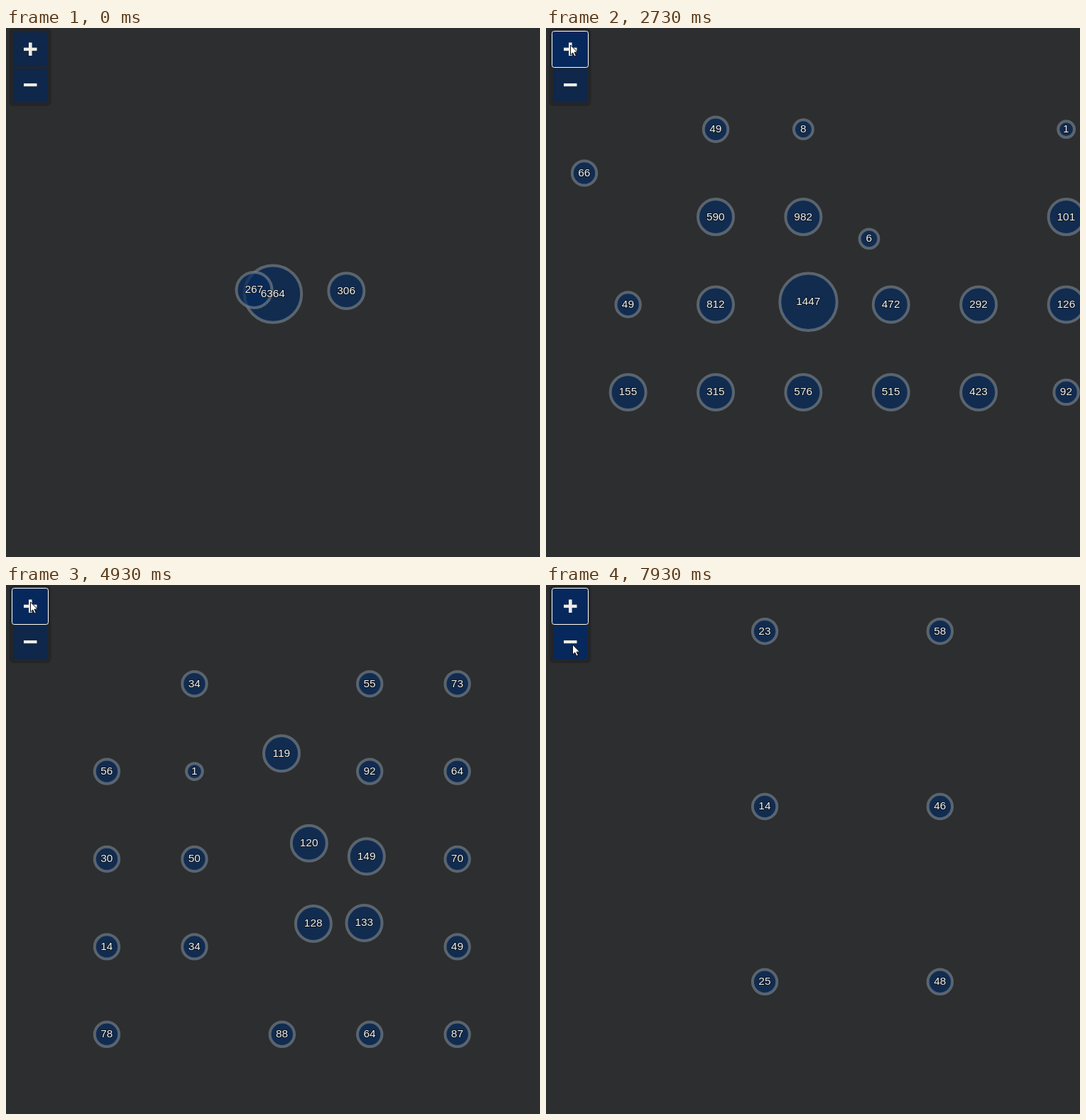
An HTML page with a canvas for the animation above (8 s loop, 752 by 745 pixels).

```html
<!DOCTYPE html>
<html lang="en">
<head>
<meta charset="utf-8">
<title>Cluster map zoom</title>
<style>
html, body { margin: 0; width: 100%; height: 100%; overflow: hidden; background: #2d2e2f; }
canvas { display: block; }
</style>
</head>
<body>
<canvas id="map" width="752" height="745"></canvas>
<script>
const ctx = document.getElementById('map').getContext('2d');
const LOOP = 8000, ZOOM_MS = 330, CX = 374.7, CY = 369.6, CELL = 123.4;

let seed = 7;
const random = () => (seed = seed * 16807 % 2147483647) / 2147483647;

// Clusters sit on a regular grid; each row is a line of labels, "." is an empty cell.
const grid = (x, y, ...rows) => rows.flatMap((row, j) => row.split(' ')
  .map((label, i) => ({ x: x + i * CELL, y: y + j * CELL, label }))
  .filter(c => c.label !== '.'));

const at = (x, y, label) => ({ x, y, label });

// Scattered two-digit clusters around a 3 by 3 core, soon pushed out of view.
function ring(x, y) {
  const rows = [0, 1, 2, 3, 4].map(j => [0, 1, 2, 3, 4].map(i => {
    const inner = i % 4 && j % 4;
    return inner || random() < .3 ? '.' : String(10 + Math.floor(random() * 85));
  }).join(' '));
  return grid(x - CELL, y - CELL, ...rows);
}

// Each level appears at `from` and starts to zoom in at `zoom`.
const levels = [
  { from: 0, zoom: 1150, clusters: [at(376, 374.6, '6364'), at(349.5, 369, '267'), at(479.3, 370.2, '306')] },
  { from: 1730, zoom: 2222, clusters: [
    ...grid(214, 287.2, '66 . 51 101', '202 . . 213 1'),
    at(363, 378, '3114'), at(344.5, 315.5, '1608'), at(456.2, 413.8, '1652')] },
  { from: 2730, zoom: 3280, clusters: [
    ...grid(115.6, 142.7,
      '. 49 8 . . 1',
      '. 590 982 . . 101',
      '49 812 . 472 292 126',
      '155 315 576 515 423 92'),
    at(54, 204.4, '66'), at(455, 296.8, '6'), at(369.5, 385.8, '1447')] },
  { from: 3800, zoom: 4529, clusters: grid(42.2, 100.4,
    '63 131 219 2',
    '160 1 595 189 4',
    '176 471 384 442 124 93',
    '102 86 185 468 144 126',
    '164 79 198 312 1 197',
    '56 39 43 48 49 87') },
  { from: 4930, zoom: 5563, clusters: [
    ...ring(265.4, 262.6), ...grid(265.4, 262.6, '1 . 92', '50', '34'),
    at(388, 237.2, '119'), at(426.8, 363.7, '120'), at(507.8, 382.2, '149'),
    at(432.9, 477, '128'), at(504.5, 476, '133')] },
  { from: 5930, zoom: 6754, clusters: [
    ...ring(218, 217.4), ...grid(218, 217.4, '. 23 58', '. 14 46', '. 25 48')] }
];

function zoomScale(t, start) {
  const p = Math.min(1, Math.max(0, (t - start) / ZOOM_MS));
  return 2 / (1 + (1 - p) ** 3);
}

// Pointer rests on "+", then dips below "-" and settles on it.
const mix = (a, b, p) => a + (b - a) * p;
const ease = (t, from, to) => {
  const p = Math.min(1, Math.max(0, (t - from) / (to - from)));
  return p * p * (3 - 2 * p);
};

function pointer(t) {
  if (t < 530) return null;
  const enter = ease(t, 530, 930), down = ease(t, 7300, 7600), back = ease(t, 7700, 7930);
  return { x: mix(43, 34, enter) + 6 * down - 3 * back, y: mix(6, 24, enter) + 73 * down - 13 * back };
}

const arrow = new Path2D('M0 0V14L3.2 11L5.5 16L7.8 15L5.5 10.2H10Z');

const radius = label => [11.4, 17.2, 25, 40.2][label.length - 1] + (label.length < 2 && label > 1 ? 2 : 0);

function drawDisc({ x, y, label }) {
  ctx.beginPath();
  ctx.arc(x, y, radius(label), 0, 7);
  ctx.fillStyle = 'rgba(8,44,94,.7)';
  ctx.fill();
  ctx.strokeStyle = 'rgba(115,125,133,.7)';
  ctx.lineWidth = 4;
  ctx.stroke();
}

function drawLabel({ x, y, label }) {
  ctx.font = '15.4px "Liberation Sans", Arial, sans-serif';
  ctx.textAlign = 'center';
  ctx.lineWidth = 2;
  ctx.strokeStyle = 'rgba(0,0,0,.5)';
  ctx.strokeText(label, x - .2, y + 4.4);
  ctx.fillStyle = '#f5f0e4';
  ctx.fillText(label, x - .2, y + 4.4);
}

function box(x, y, w, h, r, fill) {
  ctx.beginPath();
  ctx.roundRect(x, y, w, h, r);
  ctx.fillStyle = fill;
  ctx.fill();
}

const buttonColor = lit => lit ? 'rgba(0,42,105,.8)' : 'rgba(9,41,83,.8)';

function drawControls(t, mouse) {
  const focused = t >= 1130, grow = focused ? 1 : 0;
  box(4.5, 0, 59, 110, 6, 'rgba(30,33,36,.6)');
  box(10 - grow, 6 - grow, 48 + 2 * grow, 48 + 2 * grow, 2, buttonColor(mouse));
  box(10, 57, 48, 47.5, 2, buttonColor(mouse && mouse.y > 56));
  ctx.fillStyle = '#eeebe2';
  ctx.fillRect(25, 27.7, 18.5, 4.4);
  ctx.fillRect(32, 20.5, 4.6, 18.5);
  ctx.fillRect(25, 78, 18.5, 4.2);
  if (focused) {
    ctx.beginPath();
    ctx.roundRect(8.5, 4.5, 51, 51, 3);
    ctx.strokeStyle = '#fff';
    ctx.lineWidth = 1;
    ctx.stroke();
  }
}

function drawTooltip() {
  ctx.fillStyle = '#4d4d4d';
  ctx.fillRect(60, 63, 155, 63);
  ctx.strokeStyle = '#d4d4d4';
  ctx.lineWidth = 2.4;
  ctx.strokeRect(60.2, 63.7, 154.4, 62);
  ctx.font = '30px "Open Sans", "Noto Sans", sans-serif';
  ctx.textAlign = 'left';
  ctx.fillStyle = '#d8d8d8';
  ctx.fillText('Zoom in', 79, 106.5);
}

function drawPointer({ x, y }) {
  ctx.save();
  ctx.translate(x + .5, y);
  ctx.fillStyle = '#fff';
  ctx.fill(arrow);
  ctx.strokeStyle = '#111';
  ctx.lineWidth = 1;
  ctx.stroke(arrow);
  ctx.restore();
}

function draw(t) {
  ctx.fillStyle = '#2d2e2f';
  ctx.fillRect(0, 0, 752, 745);
  const level = levels.findLast(l => l.from <= t);
  const s = zoomScale(t, level.zoom);
  const shown = level.clusters.map(c => at(mix(CX, c.x, s), mix(CY, c.y, s), c.label));
  shown.forEach(drawDisc);
  shown.forEach(drawLabel);

  const mouse = pointer(t);
  drawControls(t, mouse);
  if (t >= 1400 && t < 2200) drawTooltip();
  if (mouse) drawPointer(mouse);
}

const start = performance.now();
function frame() {
  draw((performance.now() - start) % LOOP);
  requestAnimationFrame(frame);
}
frame();
</script>
</body>
</html>
```
